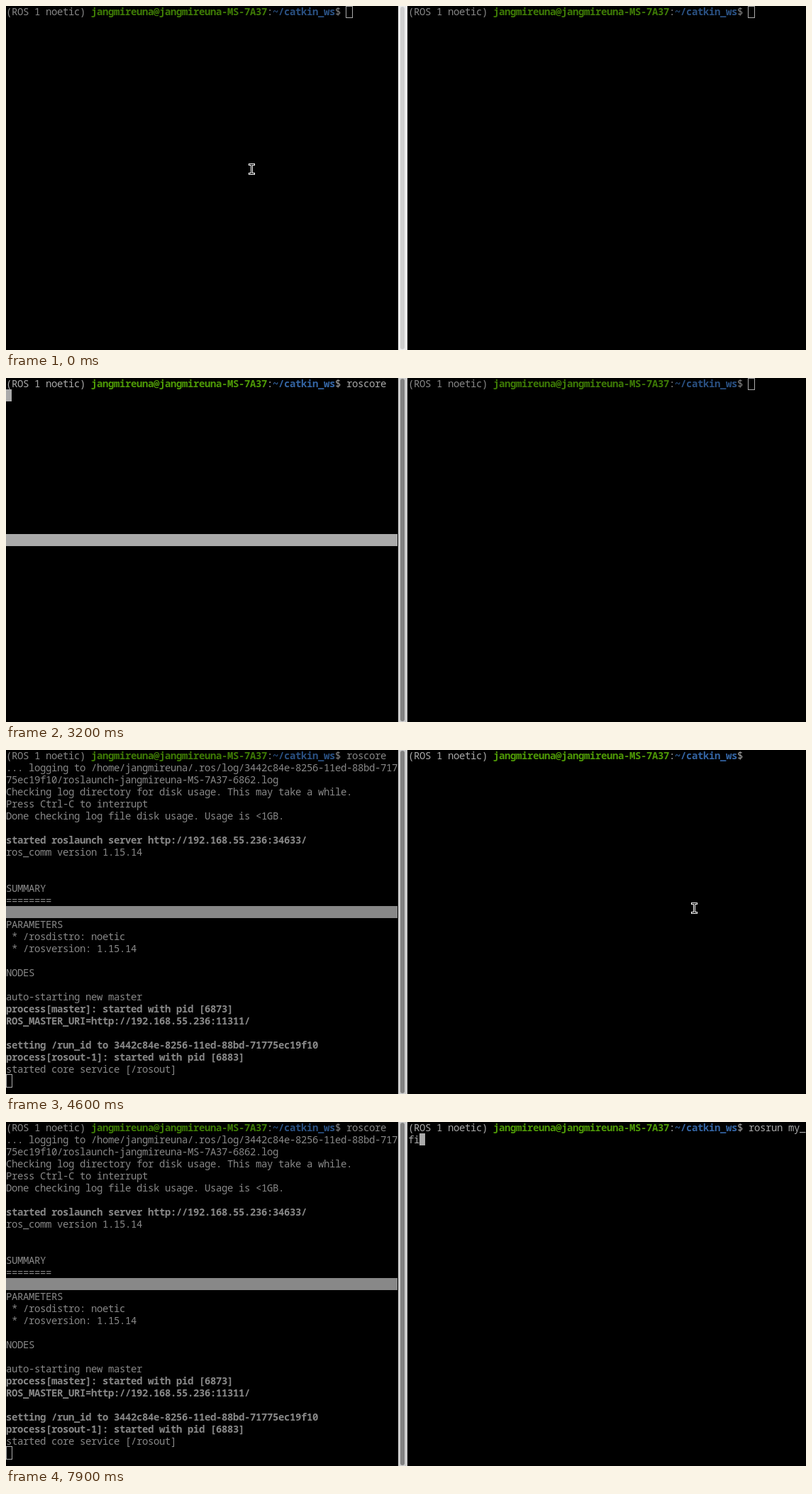
These frames come from a looping animation (1128x485 px, 8000 ms). An HTML page:

```html
<!DOCTYPE html>
<html lang="en">
<head>
<meta charset="utf-8">
<title>Two terminals</title>
<style>
  html, body { margin: 0; width: 100%; height: 100%; overflow: hidden; background: #000; }
  svg { display: block; width: 1128px; height: 485px; }
  text {
    font: 500 14px "Noto Sans Mono", "DejaVu Sans Mono", monospace;
    letter-spacing: -0.4px; white-space: pre; fill: var(--fg);
  }
  .b { font-weight: 700; }
  .user { font-weight: 700; fill: var(--green); }
  .path { font-weight: 700; fill: var(--blue); }
  .pane { --fg: #888; --green: #3e7b05; --blue: #2a5183; }
  .pane.on { --fg: #aaa; --green: #4e9a06; --blue: #3465a4; }
  .sel { fill: var(--fg); }
</style>
</head>
<body>
<svg id="stage" viewBox="0 0 1128 485">
  <rect width="1128" height="485" fill="#000"/>
  <g id="left" class="pane"></g>
  <rect id="track" x="553" y="0" width="13" height="485"/>
  <rect id="thumb" x="556" y="1" width="6" height="483" rx="3"/>
  <g id="right" class="pane" transform="translate(567 0)"></g>
  <g id="mouse" fill="none" stroke-linecap="square">
    <path d="M-3-6.5h6M-3 6.5h6M0-6.5v13" stroke="#fff" stroke-width="3"/>
    <path d="M-3-6.5h6M-3 6.5h6M0-6.5v13" stroke="#000" stroke-width="1"/>
  </g>
</svg>
<script>
const LOOP = 8000, STEP = 100, CELL = 8, ROW = 17, BLINK = 600, PROMPT = 60;
const USER = 'jangmireuna', HOST = USER + '-MS-7A37';
const RUN = '3442c84e-8256-11ed-88bd-71775ec19f10';
const $ = id => document.getElementById(id);

// Lines starting with "!" are bold.
const OUTPUT = [
  `... logging to /home/${USER}/.ros/log/${RUN.slice(0, 27)}`,
  `${RUN.slice(27)}/roslaunch-${HOST}-6862.log`,
  'Checking log directory for disk usage. This may take a while.',
  'Press Ctrl-C to interrupt',
  'Done checking log file disk usage. Usage is <1GB.',
  '',
  '!started roslaunch server http://192.168.55.236:34633/',
  'ros_comm version 1.15.14',
  '', '',
  'SUMMARY',
  '========',
  '',
  'PARAMETERS',
  ' * /rosdistro: noetic',
  ' * /rosversion: 1.15.14',
  '',
  'NODES',
  '',
  'auto-starting new master',
  '!process[master]: started with pid [6873]',
  '!ROS_MASTER_URI=http://192.168.55.236:11311/',
  '',
  `!setting /run_id to ${RUN}`,
  '!process[rosout-1]: started with pid [6883]',
  'started core service [/rosout]'
];

// [time, value]
const LEFT_KEYS = [[0, ''], [1000, 'c'], [1100, 'cl'], [1300, 'cle'], [1600, 'clea'], [2000, 'c'],
  [2200, ''], [2400, 'r'], [2500, 'ro'], [2700, 'rosc'], [2900, 'roscor'], [3000, 'roscore']];
const RIGHT_KEYS = [[0, ''], [6000, 'r'], [6100, 'ro'], [6300, 'ros'], [6400, 'rosr'], [6500, 'rosru'],
  [6600, 'rosrun '], [7100, 'rosrun m'], [7500, 'rosrun my'], [7900, 'rosrun my_fi']];
const LINES = [[0, 0], [3500, 4], [3600, 5], [3700, 20], [3800, 22], [3900, 26]];
const MOUSE = [[0, [346, 230]], [1000, null], [3500, [346, 230]], [3600, [420, 236]], [3700, [600, 240]],
  [3800, [800, 237]], [3900, [922, 232]], [4000, [958, 226]], [4100, [968, 224]], [4200, [970, 224]],
  [4500, [970, 223]], [5900, null]];
const LEFT_FOCUS = 200, SELECT = 400, ENTER = 3200, RIGHT_FOCUS = 4000;

const last = (table, t) => table.filter(row => row[0] <= t).pop();
const show = (el, on) => el.setAttribute('visibility', on ? 'visible' : 'hidden');

function add(parent, tag, attrs, text = '') {
  const el = document.createElementNS('http://www.w3.org/2000/svg', tag);
  for (const k in attrs) el.setAttribute(k, attrs[k]);
  el.textContent = text;
  return parent.appendChild(el);
}
const write = (parent, col, row, text, cls = '') =>
  add(parent, 'text', { x: col * CELL, y: row * ROW + 13, class: cls }, text);

function makePane(id) {
  const g = $(id);
  write(g, 0, 0, '(ROS 1 noetic) ');
  write(g, 15, 0, `${USER}@${HOST}`, 'user');
  write(g, 46, 0, ':');
  write(g, 47, 0, '~/catkin_ws', 'path');
  write(g, 58, 0, '$');
  return {
    g,
    typed: write(g, PROMPT, 0, ''),
    wrapped: write(g, 0, 1, ''),
    cursor: add(g, 'rect', {})
  };
}

// Without focus the cursor is an outline one pixel larger than its cell.
function drawCursor(el, col, row, focused, since) {
  const grow = focused ? 0 : 1, inset = grow / 2;
  const x = Math.max(0, col * CELL - grow), right = (col + 1) * CELL + grow;
  const y = Math.max(0, row * ROW - 1 - grow), bottom = row * ROW + 16 + grow;
  const box = {
    x: x + inset, y: y + inset,
    width: right - x - grow, height: bottom - y - grow,
    fill: focused ? '#aaa' : 'none', stroke: focused ? 'none' : '#aaa'
  };
  for (const k in box) el.setAttribute(k, box[k]);
  show(el, !focused || Math.floor(since / BLINK) % 2 === 0);
}

const left = makePane('left'), right = makePane('right');
const output = OUTPUT.map((s, i) =>
  write(left.g, 0, i + 1, s.replace('!', ''), s[0] === '!' ? 'b' : ''));
const selection = add(left.g, 'rect', { x: 0, y: 220, width: 552, height: 17, class: 'sel' });

function draw(t) {
  const leftOn = t >= LEFT_FOCUS && t < RIGHT_FOCUS, rightOn = t >= RIGHT_FOCUS;
  left.g.classList.toggle('on', leftOn);
  right.g.classList.toggle('on', rightOn);

  const [leftTime, command] = last(LEFT_KEYS, t);
  const count = last(LINES, t)[1];
  const entered = t >= ENTER;
  left.typed.textContent = command;
  output.forEach((el, i) => show(el, i < count));
  show(selection, t >= SELECT);
  drawCursor(left.cursor, entered ? 0 : PROMPT + command.length, entered ? count + 1 : 0,
    leftOn, t - Math.max(LEFT_FOCUS, entered ? ENTER : leftTime));

  const [rightTime, keys] = last(RIGHT_KEYS, t);
  const room = 10, wraps = keys.length > room;
  right.typed.textContent = keys.slice(0, room);
  right.wrapped.textContent = keys.slice(room);
  drawCursor(right.cursor, wraps ? keys.length - room : PROMPT + keys.length, wraps ? 1 : 0,
    rightOn, t - Math.max(RIGHT_FOCUS, rightTime));

  // The scrollbar darkens once the window has focus.
  const k = Math.min(1, Math.max(0, (t - LEFT_FOCUS + STEP) / (4 * STEP)));
  const grey = (a, b) => { const v = Math.round(a + (b - a) * k); return `rgb(${v},${v},${v})`; };
  $('track').setAttribute('fill', grey(240, 207));
  $('thumb').setAttribute('fill', grey(208, 130));

  const spot = last(MOUSE, t)[1];
  show($('mouse'), spot);
  if (spot) $('mouse').setAttribute('transform', `translate(${spot[0] + 0.5} ${spot[1]})`);
}

const start = performance.now();
function tick() {
  const t = (performance.now() - start) % LOOP;
  draw(Math.floor(t / STEP) * STEP);
  requestAnimationFrame(tick);
}
tick();
</script>
</body>
</html>
```
